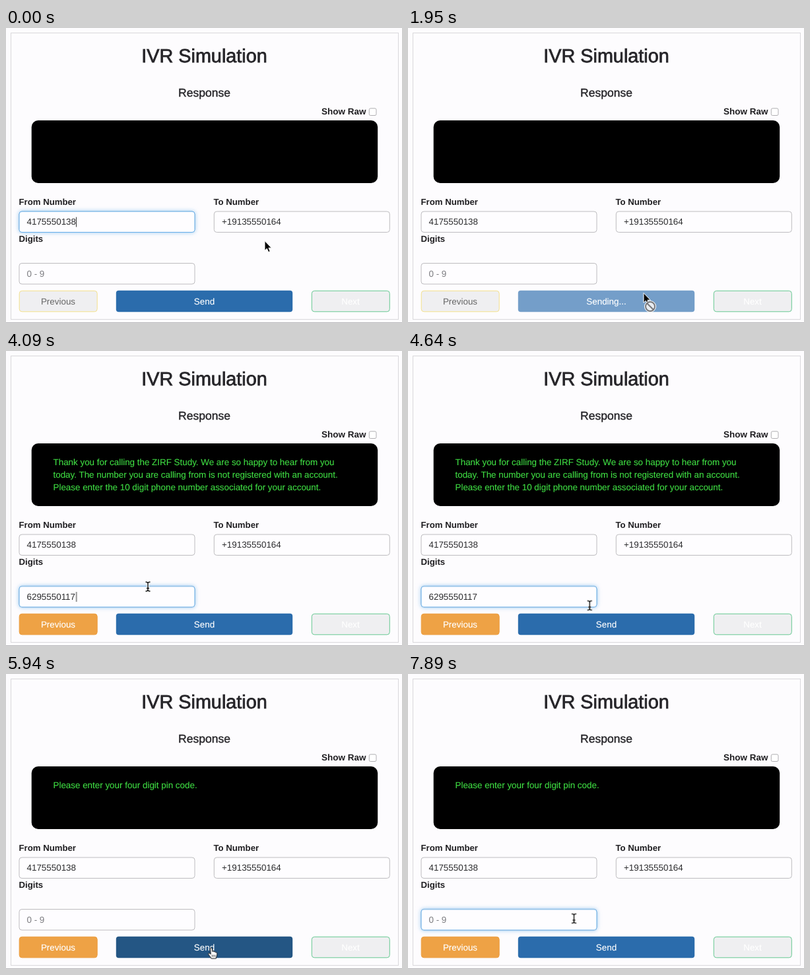
These frames come from a looping animation (600 by 447 pixels, 8 s). An HTML page:

```html
<!DOCTYPE html>
<html lang="en">
<head>
<meta charset="utf-8">
<title>IVR Simulation</title>
<style>
html, body { margin: 0; width: 100%; height: 100%; overflow: hidden; background: #fdfcfe; }
svg { display: block; width: 600px; height: 447px; }
text {
  font: 13.4px "Liberation Sans", Arial, sans-serif;
  fill: #2c2c2e; text-rendering: geometricPrecision; white-space: pre;
}
.mid { text-anchor: middle; }
.bold { font-weight: 700; font-size: 13.2px; fill: #1f1e21; }
.head { fill: #262529; stroke: #262529; stroke-width: .8; }
.title { font-size: 28.8px; }
.sub { font-size: 17.5px; stroke-width: .4; }
.white { fill: #fff; stroke: #fff; stroke-width: .15; }
.hint { fill: #7c7c80; }
.reply text { fill: #3fdc43; stroke: #3fdc43; stroke-width: .12; }
.field { fill: #fefdff; stroke: #bdbcbf; }
.focus { fill: #fefdff; stroke: #66aee9; filter: drop-shadow(0 0 3px #66afe9aa); }
.caret { fill: #333; }

/* Every animation shares one 8 s clock. */
.anim, .anim * { animation-duration: 8s; animation-iteration-count: infinite; animation-timing-function: step-end; }

.from-focus { animation-name: fromFocus; }
.digits-focus { animation-name: digitsFocus; }
.typed { animation-name: typed; }
.cover { animation-name: typing; }
.cover .caret { animation-name: caret; }
.empty { animation-name: empty; }
.reply-1 { animation-name: reply1; }
.reply-2 { animation-name: reply2; }
.prev-off { animation-name: prevOff; }
.prev-on { animation-name: prevOn; }
.send-fill { animation-name: sendFill; }
.send-ring { animation-name: sendRing; }
.idle { animation-name: idle; }
.busy { animation-name: busy; }
.pointer { animation-name: move; animation-timing-function: linear !important; }
.arrow { animation-name: arrow; }
.hand { animation-name: hand; }
.beam { animation-name: beam; }

@keyframes fromFocus { 0% { opacity: 1 } 7%, 100% { opacity: 0 } }
@keyframes digitsFocus {
  0% { opacity: 0 } 40.75% { opacity: 1 } 67.2% { opacity: 0 } 93.1%, 100% { opacity: 1 }
}
@keyframes typed { 0% { opacity: 0 } 41.9% { opacity: 1 } 73.1%, 100% { opacity: 0 } }
@keyframes empty { 0% { opacity: 1 } 42.7% { opacity: 0 } 73.1%, 100% { opacity: 1 } }
@keyframes typing {
  0% { transform: none }
  41.9% { transform: translateX(0); animation-timing-function: steps(10, end) }
  50.5% { transform: translateX(74.5px) }
  73.1%, 100% { transform: none }
}
@keyframes caret {
  0% { opacity: 0 } 40.75% { opacity: 1 } 55.75% { opacity: 0 } 61.5% { opacity: 1 }
  63.9% { opacity: 0 } 93.1% { opacity: 1 } 97.5%, 100% { opacity: 0 }
}
@keyframes reply1 { 0% { opacity: 0 } 29% { opacity: 1 } 73.1%, 100% { opacity: 0 } }
@keyframes reply2 { 0% { opacity: 0 } 73.1%, 100% { opacity: 1 } }
@keyframes prevOff { 0% { opacity: 1 } 29%, 100% { opacity: 0 } }
@keyframes prevOn { 0% { opacity: 0 } 29%, 100% { opacity: 1 } }
@keyframes sendFill {
  0% { fill: #2b6cac } 5.9% { fill: #245684 } 7% { fill: #1f69b3 } 8.1% { fill: #749ec9 }
  29% { fill: #245684 } 37% { fill: #2b6cac } 59.4% { fill: #245684 } 63.9% { fill: #1f69b3 }
  67.2% { fill: #749ec9 } 73.1% { fill: #245684 } 90%, 100% { fill: #2b6cac }
}
@keyframes sendRing {
  0% { opacity: 0 } 7% { opacity: 1 } 8.1% { opacity: 0 } 63.9% { opacity: 1 } 67.2%, 100% { opacity: 0 }
}
@keyframes idle {
  0% { opacity: 1 } 8.1% { opacity: 0 } 29% { opacity: 1 } 67.2% { opacity: 0 } 73.1%, 100% { opacity: 1 }
}
@keyframes busy {
  0% { opacity: 0 } 8.1% { opacity: 1 } 29% { opacity: 0 } 67.2% { opacity: 1 } 73.1%, 100% { opacity: 0 }
}
@keyframes move {
  0%, 2.4% { transform: translate(392px, 323px) }
  6%, 34.2% { transform: translate(357px, 402px) }
  36%, 37% { transform: translate(331px, 392px) }
  41%, 52.2% { transform: translate(215px, 357px) }
  56.5% { transform: translate(258px, 373px) }
  61.5%, 70.7% { transform: translate(315px, 414.5px) }
  76.6%, 88.1% { transform: translate(308px, 415.5px) }
  93.5%, 100% { transform: translate(251.5px, 370.5px) }
}
@keyframes arrow {
  0% { opacity: 1 } 5.9% { opacity: 0 } 8.1% { opacity: 1 } 29% { opacity: 0 } 35.5% { opacity: 1 }
  37.75% { opacity: 0 } 58.5% { opacity: 1 } 59.4% { opacity: 0 } 67.2% { opacity: 1 }
  73.1% { opacity: 0 } 90% { opacity: 1 } 91.25%, 100% { opacity: 0 }
}
@keyframes hand {
  0% { opacity: 0 } 5.9% { opacity: 1 } 8.1% { opacity: 0 } 29% { opacity: 1 } 35.5% { opacity: 0 }
  59.4% { opacity: 1 } 67.2% { opacity: 0 } 73.1% { opacity: 1 } 90%, 100% { opacity: 0 }
}
@keyframes beam {
  0% { opacity: 0 } 37.75% { opacity: 1 } 58.5% { opacity: 0 } 91.25%, 100% { opacity: 1 }
}
</style>
</head>
<body>
<svg viewBox="0 0 600 447" class="anim">
  <defs>
    <rect id="input" width="266" height="31.5" rx="4"/>
    <rect id="side" width="118" height="31.5" rx="4"/>
    <path id="ibeam" d="M-3.5 -7Q0 -7 0 -5Q0 -7 3.5 -7M0 -5V5M-3.5 7Q0 7 0 5Q0 7 3.5 7M-2 2.5H2"/>
  </defs>

  <rect width="600" height="447" fill="#fdfcfe"/>
  <rect x="7.5" y="7.5" width="587" height="434" fill="none" stroke="#d9d8db"/>
  <path d="M0 446.5H600" stroke="#b4b3b6"/>

  <text class="mid head title" x="300.5" y="52">IVR Simulation</text>
  <text class="mid head sub" x="300.5" y="104.2">Response</text>
  <text class="bold" x="478" y="130.7" style="font-size:13.5px">Show Raw</text>
  <rect x="550.3" y="121.8" width="10.7" height="10.7" rx="2" fill="#fff" stroke="#b0afb2"/>

  <rect x="38.7" y="140" width="524.5" height="95" rx="10"/>
  <g class="reply reply-1">
    <text x="71.5" y="173.2">Thank you for calling the ZIRF Study. We are so happy to hear from you</text>
    <text x="71.5" y="192.1">today. The number you are calling from is not registered with an account.</text>
    <text x="71.5" y="211">Please enter the 10 digit phone number associated for your account.</text>
  </g>
  <g class="reply reply-2">
    <text x="71.5" y="173.2">Please enter your four digit pin code.</text>
  </g>

  <text class="bold" x="19.5" y="268">From Number</text>
  <use href="#input" class="field" x="20" y="278"/>
  <use href="#input" class="focus from-focus" x="20" y="278"/>
  <text x="31.5" y="298.3">4175550138</text>
  <rect class="caret from-focus" x="106" y="286.5" width="1" height="15"/>

  <text class="bold" x="314.5" y="268">To Number</text>
  <use href="#input" class="field" x="315.3" y="278"/>
  <text x="327" y="298.3">+19135550164</text>

  <text class="bold" x="19.5" y="324">Digits</text>
  <use href="#input" class="field" x="20" y="356.5"/>
  <use href="#input" class="focus digits-focus" x="20" y="356.5"/>
  <text class="typed" x="31.5" y="377">6295550117</text>
  <g class="cover">
    <rect x="31.5" y="362" width="90" height="20" fill="#fefdff"/>
    <rect class="caret" x="31.7" y="365" width="1" height="15"/>
  </g>
  <text class="hint empty" x="31.5" y="377">0 - 9</text>

  <g class="prev-off">
    <use href="#side" x="20.2" y="398.3" fill="#efeff1" stroke="#f3e08a"/>
    <text class="mid" x="79" y="418.6" style="fill:#666">Previous</text>
  </g>
  <g class="prev-on">
    <use href="#side" x="20.2" y="398.3" fill="#eea245" stroke="#eb9c3c"/>
    <text class="mid white" x="79" y="418.6">Previous</text>
  </g>

  <rect class="send-ring" x="165.8" y="396.6" width="269.6" height="34.6" rx="4" fill="none" stroke="#2b6fd6" stroke-width="2.5"/>
  <rect class="send-fill" x="166.8" y="397.8" width="267.4" height="32.4" rx="4"/>
  <text class="mid white idle" x="300.5" y="418.6">Send</text>
  <text class="mid white busy" x="300.5" y="418.6">Sending...</text>

  <use href="#side" x="463.3" y="398.3" fill="#efeff1" stroke="#66c892"/>
  <text class="mid white" x="522" y="418.6">Next</text>

  <g class="pointer">
    <g class="arrow">
      <path d="M0 -.5V14.2L3.3 11.2L5.7 16.6L8.2 15.5L5.9 10.2H10.3Z" fill="#000" stroke="#fff"/>
      <g class="busy" fill="none">
        <circle cx="10" cy="20" r="7" stroke="#fff" stroke-width="4"/>
        <g stroke="#77787c" stroke-width="2">
          <circle cx="10" cy="20" r="7" fill="#e9edf2"/>
          <path d="M5 15L15 25"/>
        </g>
      </g>
    </g>
    <g class="hand" stroke="#111" stroke-linejoin="round">
      <path fill="#fff" d="M-1.5 1C-1.5 -.6 1.2 -.6 1.4 1L2 5.5C2.4 4.4 4.4 4.5 4.6 6C5.2 5.2 6.8 5.6 6.9 7C7.8 6.5 9 7 9 8.4C9 11.5 8 12.5 7.4 16H.2C-.6 13.6 -3 11.8 -4.2 9.4C-4.6 7.8 -2.6 7.4 -.6 9.6Z"/>
      <path d="M1.5 10.5V13.5M3.7 10.5V13.5M5.9 10.5V13.5" stroke-width=".8"/>
    </g>
    <g class="beam" fill="none">
      <use href="#ibeam" stroke="#fff" stroke-width="3"/>
      <use href="#ibeam" stroke="#111" stroke-width="1.4"/>
    </g>
  </g>
</svg>
</body>
</html>
```
